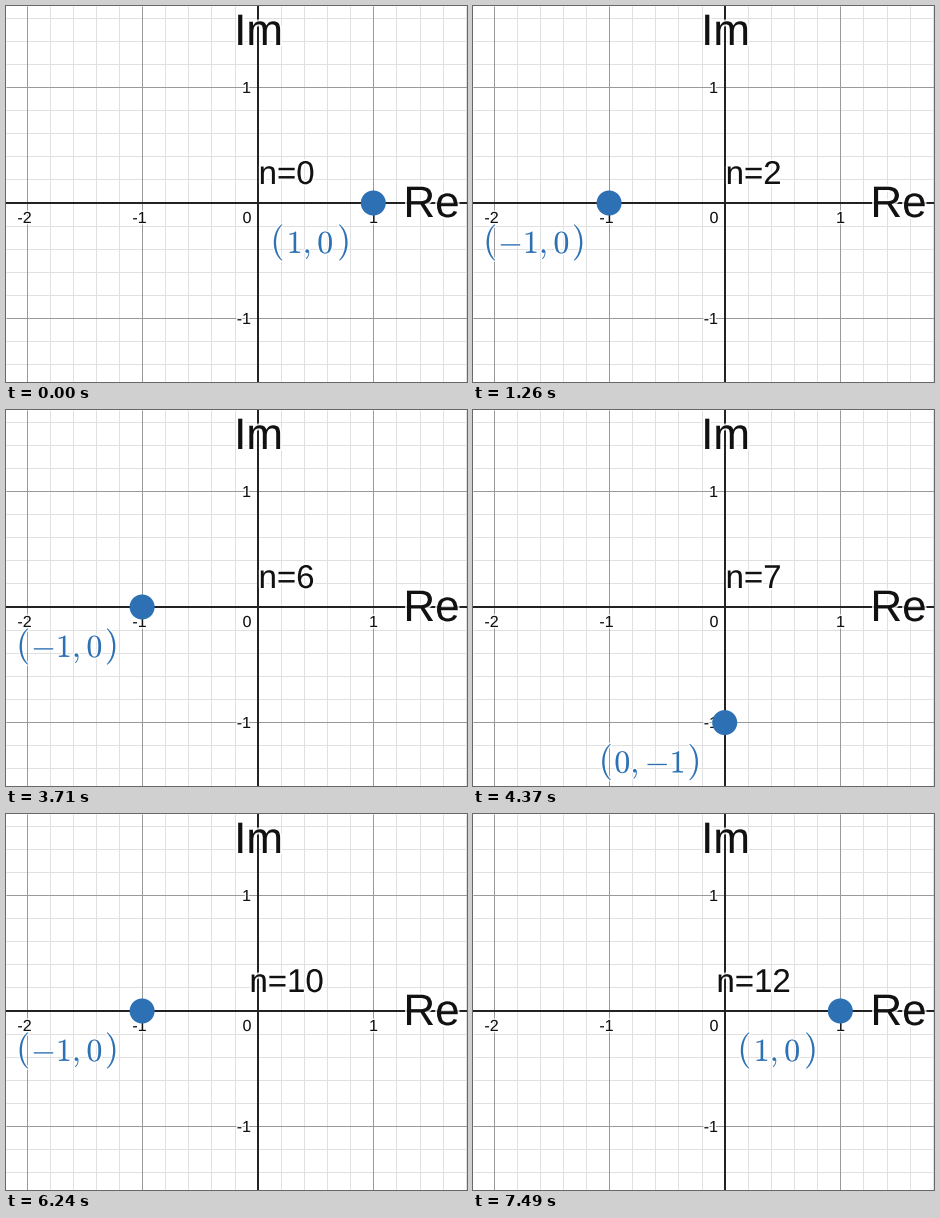
Recreate the animation shown at these times as a matplotlib script. Size 461 px wide and 376 px high, loop 8000 ms.

```python
import matplotlib.pyplot as plt
from matplotlib.animation import FuncAnimation
from matplotlib.patches import Circle
from matplotlib.patheffects import withStroke

W, H, DPI = 461, 376, 100
CX, CY, UNIT = 251.7, 196.6, 115.6
STEP, LOOP = 20, 8000
SWITCHES = [600, 1260, 1860, 2460, 3120, 3710,
            4370, 4970, 5630, 6240, 6830, 7490]
POWERS = [(1, 0), (0, 1), (-1, 0), (0, -1)]  # i**n
BLUE = "#2d70b3"

plt.rcParams["font.family"] = "Liberation Sans"
plt.rcParams["mathtext.fontset"] = "cm"


def pt(px):
    return px * 72 / DPI


fig = plt.figure(figsize=(W / DPI, H / DPI), dpi=DPI, facecolor="white")
ax = fig.add_axes([0, 0, 1, 1])
ax.set(xlim=(0, W), ylim=(H, 0))
ax.axis("off")


def grid(spacing, reach, color, width, z):
    offsets = [k * spacing for k in range(-reach, reach + 1)]
    style = dict(colors=color, linewidths=pt(width), zorder=z)
    ax.vlines([CX + d for d in offsets], 0, H, **style)
    ax.hlines([CY + d for d in offsets], 0, W, **style)


def label(x, y, text, size, ha="center", color="#111111", z=5, halo=3):
    effect = withStroke(linewidth=pt(halo), foreground=(1, 1, 1, 0.8))
    return ax.text(x, y, text, fontsize=pt(size), ha=ha, va="baseline",
                   color=color, zorder=z, path_effects=[effect])


grid(UNIT / 5, 11, "#e0e0e0", 1, 1)
grid(UNIT, 2, "#999999", 1, 2)
grid(UNIT, 0, "#222222", 2, 3)

for x, text in [(18.5, "-2"), (133.5, "-1"), (241, "0"), (367.5, "1")]:
    label(x, 217, text, 16)
label(245, 87, "1", 16, "right")
label(245, 318, "-1", 16, "right")
label(252.5, 39, "Im", 44, halo=4)
label(425.5, 211, "Re", 44, halo=4)

counter = label(280.5, 178, "", 33, halo=4)
dot = ax.add_patch(Circle((0, 0), 12.5, color=BLUE, lw=0, zorder=8))
coords = label(0, 0, "", 32, color=BLUE, z=9)
left = label(0, 0, "$($", 36, color=BLUE, z=9)
right = label(0, 0, "$)$", 36, color=BLUE, z=9)


def update(frame):
    time = frame * STEP + STEP / 2
    n = sum(time >= t for t in SWITCHES)
    re, im = POWERS[n % 4]
    x, y = CX + re * UNIT, CY - im * UNIT + 0.4
    middle = x - (75 if re + im < 0 else 63)
    half = 44 if re + im < 0 else 33
    counter.set_text(f"n={n}")
    dot.center = x, y
    coords.set_text(f"${{{re}}},{{{im}}}$")
    coords.set_position((middle, y + 50))
    left.set_position((middle - half, y + 48.5))
    right.set_position((middle + half, y + 48.5))
    return counter, dot, coords, left, right


anim = FuncAnimation(fig, update, frames=LOOP // STEP, interval=STEP,
                     repeat=True, repeat_delay=0)
plt.show()
```
